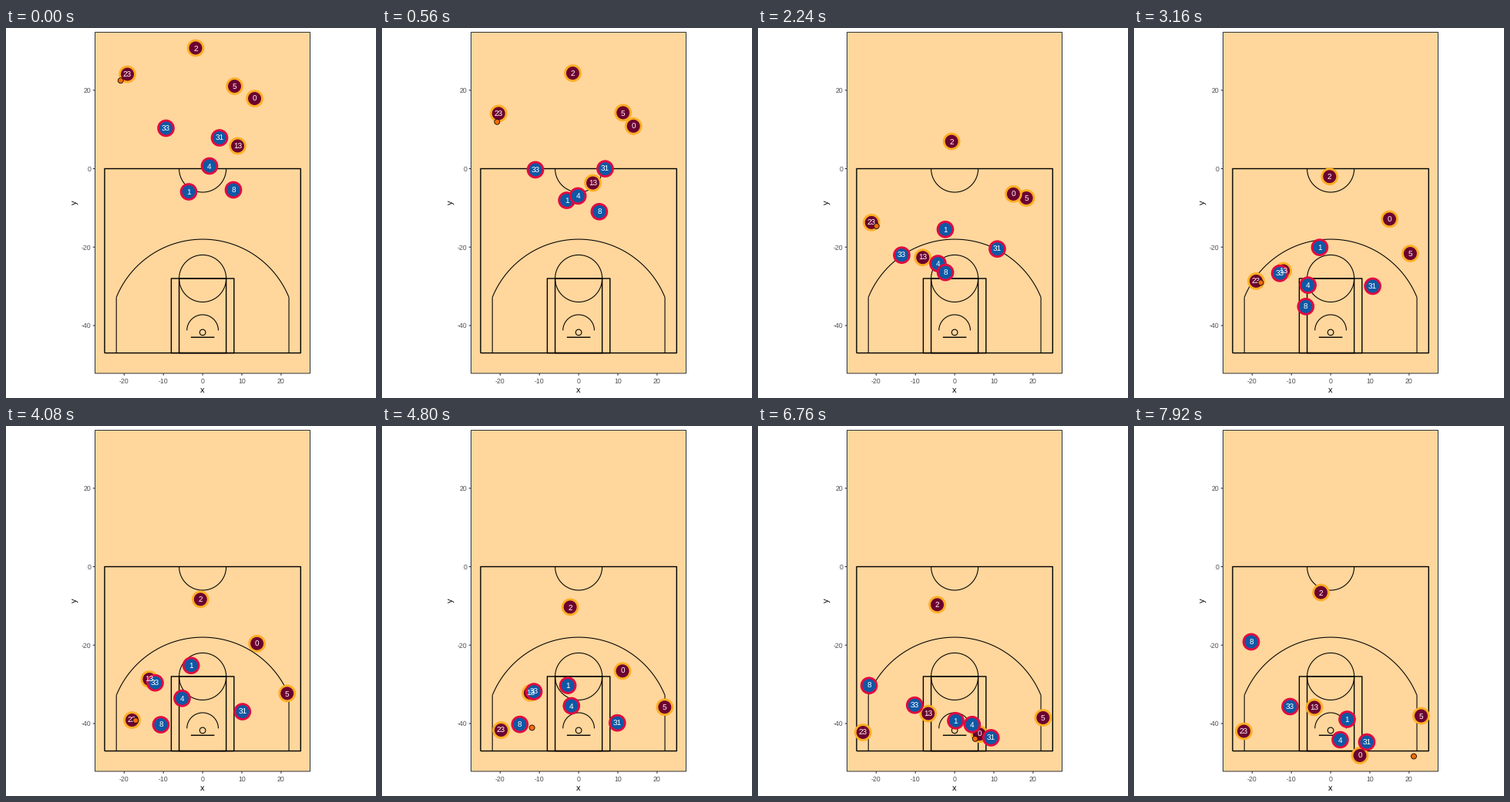
Animation, 480 px wide and 480 px high, one loop 7.96 s. Source, as a matplotlib script:

```python
import numpy as np
import matplotlib.pyplot as plt
from matplotlib.animation import FuncAnimation
from matplotlib.patches import Circle, Rectangle

SIZE, DPI = 480, 72          # at 72 dpi one point is one pixel
FRAMES, STEP = 199, 40
LAST = (FRAMES - 1) * STEP / 1000
FLOOR, GREY = "#ffd69c", "#333333"
GOLD, WINE = "#fdae22", "#6b0030"
RED, BLUE = "#e2093f", "#0e58a5"
ORANGE = "#f96a0a"

plt.rcParams.update({"font.family": "Liberation Sans",
                     "text.hinting": "none", "path.snap": False})

# Where each player is at every quarter of the play, in stage pixels
OFFENCE = {
    "2": [(246, 26), (250.5, 134), (253, 222), (232, 236), (242.5, 216)],
    "5": [(296.5, 75.5), (344, 202), (364, 342), (368, 374), (372.5, 376)],
    "0": [(322.5, 91.5), (331, 204), (327, 277), (291, 372), (293, 427.5)],
    "13": [(300.5, 153), (221, 288), (186, 326), (211, 369), (234, 365)],
    "23": [(157.5, 60), (146, 231), (164, 377), (138, 395), (142.5, 396)],
}
DEFENCE = {
    "1": [(237, 212.5), (243, 255), (240, 307), (247, 372), (276.5, 380.5)],
    "4": [(264, 179), (236, 295), (227, 351), (274, 375), (267.5, 407)],
    "8": [(295, 210), (249, 305), (204, 386), (150, 364), (152, 280)],
    "31": [(277, 142.5), (309, 272), (307, 367), (303, 397), (302, 410)],
    "33": [(207.5, 130), (187, 283), (193, 331), (202, 357), (202.5, 364)],
}


def run(points, t):
    """Smooth path through evenly timed points."""
    p = np.array(points)
    slope = np.gradient(p, axis=0, edge_order=2)
    u = t / LAST * (len(p) - 1)
    i = min(int(u), len(p) - 2)
    u -= i
    ease = u * u * (3 - 2 * u)
    return (p[i] + ease * (p[i + 1] - p[i])
            + u * (1 - u) * ((1 - u) * slope[i] - u * slope[i + 1]))


# Ball: dribbled, shot at the hoop, rebounded, thrown out
SHOT, HOOP, CATCH, LOST = 4.44, 5.5, 6.2, 7.04
RIM, SIDELINE = np.array([254, 392.5]), np.array([363, 428.5])


def dribble(t):
    angle = np.radians(150 * np.exp(-t / 2) - 13)
    reach = 12 - 1.8 * t
    return run(OFFENCE["23"], t) + reach * np.array([np.cos(angle), np.sin(angle)])


def rebound(t):
    return run(OFFENCE["0"], t) + (-5.5, 6)


def fly(a, b, start, stop, t):
    return a + (b - a) * (t - start) / (stop - start)


def ball_at(t):
    if t < SHOT:
        return dribble(t)
    if t < HOOP:
        return fly(dribble(SHOT), RIM, SHOT, HOOP, t)
    if t < CATCH:
        return fly(RIM, rebound(CATCH), HOOP, CATCH, t)
    if t < LOST:
        return rebound(t)
    return fly(rebound(LOST), SIDELINE, LOST, LAST, t)


fig = plt.figure(figsize=(SIZE / DPI, SIZE / DPI), dpi=DPI, facecolor="white")
ax = fig.add_axes([0, 0, 1, 1])
ax.set(xlim=(0, SIZE), ylim=(SIZE, 0))
ax.axis("off")


def px(x):
    return 255.1 + 5.087 * x


def py(y):
    return 182.5 - 5.087 * y


def line(xs, ys, color="black", lw=1.07):
    ax.plot(xs, ys, color=color, lw=lw, zorder=2, solid_capstyle="butt")


def court_line(xs, ys, lw=1.07):
    line(px(np.array(xs)), py(np.array(ys)), lw=lw)


def court_arc(cy, r, start=0, stop=180):
    a = np.radians(np.linspace(start, stop, 120))
    court_line(r * np.cos(a), cy + r * np.sin(a))


def court_box(half, top):
    court_line([-half, -half, half, half, -half], [-47, top, top, -47, -47], 1.4)


def label(x, y, text, size, color, **kw):
    return ax.text(x, y, text, size=size, color=color, **kw)


# Panel and axes
LEFT, RIGHT, TOP, BOTTOM = 115.5, 394.5, 5.5, 448
ax.add_patch(Rectangle((LEFT, TOP), RIGHT - LEFT, BOTTOM - TOP,
                       fc=FLOOR, ec=GREY, lw=1, zorder=1))
for v in range(-20, 21, 10):
    line([px(v)] * 2, [BOTTOM, BOTTOM + 2.75], GREY)
    label(px(v), 460.6, str(v), 8.8, "#4d4d4d", ha="center")
for v in range(-40, 21, 20):
    line([LEFT - 2.75, LEFT], [py(v)] * 2, GREY)
    label(110.6, py(v) + 3.2, str(v), 8.8, "#4d4d4d", ha="right")
label(255.1, 473, "x", 11, "black", ha="center")
label(90, 226.7, "y", 11, "black", ha="center", va="center", rotation=90)

# Half court
for half, top in ((25, 0), (8, -28), (6, -28)):
    court_box(half, top)
court_arc(0, 6, 180, 360)
court_arc(-28, 6, 0, 360)
court_arc(-41.25, 4)
court_arc(-41.75, 0.75, 0, 360)
court_line([-3, 3], [-43, -43], 1.4)
edge = np.degrees(np.arccos(22 / 23.75))
court_arc(-41.75, 23.75, edge, 180 - edge)
corner = -41.75 + np.sqrt(23.75 ** 2 - 22 ** 2)
for side in (-22, 22):
    court_line([side, side], [-47, corner])

# Players and ball
players = []
for team, fill, ring, z in ((OFFENCE, WINE, GOLD, 3), (DEFENCE, BLUE, RED, 4)):
    for number, path in team.items():
        dot = ax.add_patch(Circle((0, 0), 9.9, fc=fill, ec=ring, lw=2.85, zorder=z))
        tag = label(0, 0, number, 10, "white", ha="center", zorder=5)
        players.append((path, dot, tag))
ball = ax.add_patch(Circle((0, 0), 3.5, fc=ORANGE, ec="black", lw=0.8, zorder=6))


def draw(frame):
    t = frame * STEP / 1000
    for path, dot, tag in players:
        x, y = run(path, t)
        dot.center = x, y
        tag.set_position((x, y + 3.6))
    ball.center = tuple(ball_at(t))


anim = FuncAnimation(fig, draw, frames=FRAMES, interval=STEP, repeat=True,
                     repeat_delay=0, init_func=lambda: draw(0))
plt.show()
```
